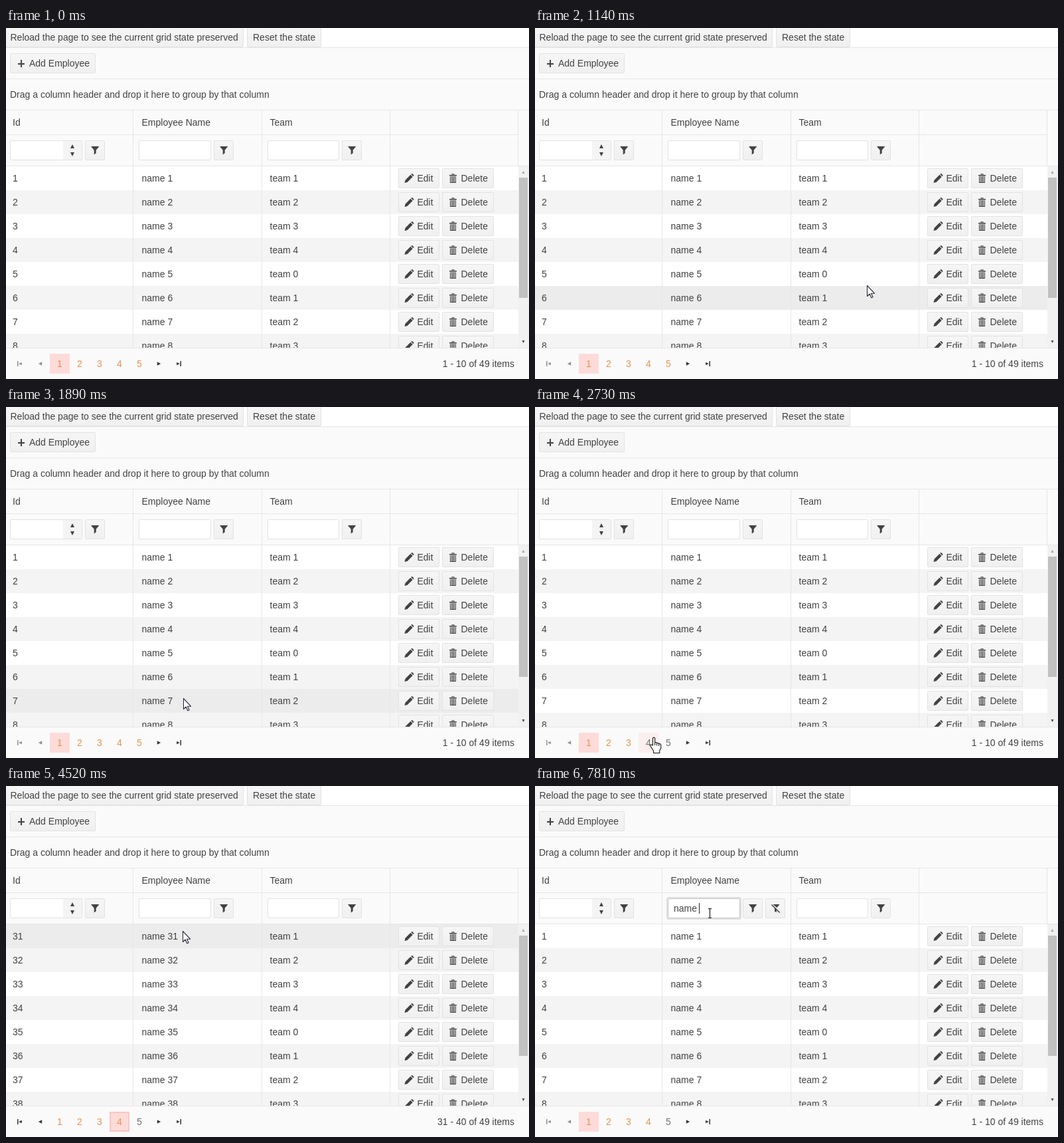
An HTML page with a canvas that plays this animation: 788x528 px, repeating every 8 s.

```html
<!DOCTYPE html>
<html lang="en">
<head>
<meta charset="utf-8">
<title>Employee grid</title>
<style>
  html, body { margin: 0; width: 100%; height: 100%; overflow: hidden; background: #fff; }
  canvas { display: block; }
</style>
</head>
<body>
<canvas width="788" height="528"></canvas>
<script>
const ctx = document.querySelector('canvas').getContext('2d');
const LOOP = 8000, STEP = 67.5;
const INK = '#424242', LINK = '#e8924f', LINE = '#e6e6e6', PANEL = '#fafafa';

// Pointer runs: start time, then [step, x, y] points joined linearly.
const runs = [
  [870, [0, 556, 514], [2, 528, 448], [4, 500, 387], [5, 492, 374]],
  [1620, [0, 470, 377], [2, 370, 401], [4, 267, 438], [7, 230, 476], [9, 204, 499], [11, 173, 494]],
  [2450, [0, 173, 495], [4, 179, 497]],
  [3060, [0, 178, 487], [3, 172, 486]],
  [4310, [0, 186, 474], [1, 216, 390], [2, 244, 302], [3, 266, 218], [5, 266, 203], [9, 263, 191]],
];

const icons = {
  plus: new Path2D('M5 0h2v5h4v2h-4v4h-2v-4h-4v-2h4z'),
  funnel: new Path2D('M0 0h12.4l-4.7 5.8v4.4l-3 2.2v-6.6z'),
  unfilter: new Path2D('M2.5 0h10l-4 5zM0 1l5 5v4.5l2.8 1.8v-3.6l4.4 4.2 1-1L1 0z'),
  pencil: new Path2D('M0 14l1.1-4.3L9 1.8l3.2 3.2-8 8zM9.8 1l.7-.7q.7-.6 1.4 0l1.8 1.8q.6.7 0 1.4l-.7.7z'),
  trash: new Path2D('M0 2h3.5V.3h4V2H11v1.5H0zM4.5 1.2V2h2v-.8zM1 4.5h9V14H1zM2.1 5v8h1V5zM4.2 5v8h.8V5zM6 5v8h.8V5zM8 5v8h1V5z'),
  arrow: new Path2D('M.5.5v16l3.7-3.5 2.6 5.8 2.3-1-2.6-5.6h5z'),
  hand: new Path2D('M-1.5 12V1.7a1.6 1.6 0 0 1 3.2 0V8q2.6-1.3 3 .8 2.6-1 3 .9 2.6-.8 3 1.6V16l-2 4v3.5h-9v-3l-4.5-7q-1-3 1.8-2.3zM1.7 8v4M4.7 9v3.5M7.7 10v3'),
  beam: new Path2D('M-2.5-6.5h2l.5.5.5-.5h2M0-6v13M-2.5 7.5h2L0 7l.5.5h2'),
};

function rect(x, y, w, h, color) {
  ctx.fillStyle = color;
  ctx.fillRect(x, y, w, h);
}

function text(value, x, y, color = INK, align = 'left') {
  ctx.fillStyle = color;
  ctx.textAlign = align;
  ctx.fillText(value, x, y);
}

function box(x, y, w, h, fill, border = '#e2e2e2') {
  ctx.beginPath();
  ctx.roundRect(x + .5, y + .5, w - 1, h - 1, 1.5);
  ctx.fillStyle = fill;
  ctx.fill();
  ctx.strokeStyle = border;
  ctx.lineWidth = 1;
  ctx.stroke();
}

function button(x, y, w, h = 30) {
  const shade = ctx.createLinearGradient(0, y, 0, y + h);
  shade.addColorStop(0, '#f6f6f6');
  shade.addColorStop(1, '#f0f0f0');
  box(x, y, w, h, shade);
}

function icon(name, x, y, color = INK) {
  ctx.save();
  ctx.translate(x, y);
  ctx.fillStyle = color;
  ctx.fill(icons[name], 'evenodd');
  ctx.restore();
}

function triangle(x, y, dx, dy, color) {
  ctx.beginPath();
  ctx.moveTo(x + dx, y + dy);
  ctx.lineTo(x - dx + dy, y - dy + dx);
  ctx.lineTo(x - dx - dy, y - dy - dx);
  ctx.fillStyle = color;
  ctx.fill();
}

function filterButton(x) {
  button(x, 169, 30);
  icon('funnel', x + 9, 178);
}

function pointerAt(t) {
  const run = runs.findLast(([start]) => t >= start);
  if (!run) return null;
  const [start, ...points] = run;
  const step = Math.floor((t - start) / STEP);
  const next = points.findIndex(([s]) => s > step);
  let [, x, y] = points.at(-1);
  if (next > 0) {
    const [s0, x0, y0] = points[next - 1], [s1, x1, y1] = points[next];
    const k = (step - s0) / (s1 - s0);
    x = x0 + (x1 - x0) * k;
    y = y0 + (y1 - y0) * k;
  }
  let shape = 'arrow';
  if (y >= 484 && x >= 66 && x < 216) shape = 'hand';
  else if (y > 169 && y < 199 && x > 200 && x < 309) shape = 'beam';
  return { x: Math.round(x), y: Math.round(y), shape };
}

function drawTop() {
  rect(0, 0, 788, 528, '#fff');
  button(-2, -2, 360, 31);
  text('Reload the page to see the current grid state preserved', 6.5, 19);
  button(363, -2, 112, 31);
  text('Reset the state', 372, 19);

  rect(0, 29, 788, 179, PANEL);
  [29, 76, 123, 207].forEach(y => rect(0, y, 788, 1, LINE));
  rect(0, 160, 772, 1, LINE);
  [191, 385, 578, 771].forEach(x => rect(x, 124, 1, 84, LINE));
  button(6, 38, 129);
  icon('plus', 17, 48);
  text('Add Employee', 35, 58);
  text('Drag a column header and drop it here to group by that column', 6, 105);
  text('Id', 10, 147);
  text('Employee Name', 204.5, 147);
  text('Team', 397.5, 147);
}

function drawFilters(t) {
  box(6, 169, 109, 30, '#fff');
  rect(86, 170, 28, 28, '#f4f4f4');
  triangle(100, 178, 0, -3, INK);
  triangle(100, 190, 0, 3, INK);
  filterButton(119);

  const focus = Math.max(0, Math.min(1, (t - 5220) / 200));
  if (focus) {
    ctx.beginPath();
    ctx.roundRect(199, 168, 111, 32, 2);
    ctx.strokeStyle = `rgba(0,0,0,${.1 * focus})`;
    ctx.lineWidth = 2;
    ctx.stroke();
  }
  box(200, 169, 109, 30, '#fff', focus ? `rgb(${Array(3).fill(226 - 28 * focus)})` : undefined);
  filterButton(313);
  if (t >= 6950) {
    text('name', 209, 189);
    button(347, 169, 30);
    icon('unfilter', 356, 178);
  }
  if (t >= 5290 && t < 5820) rect(209, 176, 1, 16, '#222');
  if (t >= 6950 && t < 7480) rect(244, 176, 1, 16, '#222');
  if (t >= 7810) rect(247, 176, 1, 16, '#222');

  box(394, 169, 108, 30, '#fff');
  filterButton(506);
}

function drawRows(first, pointer) {
  const inRows = pointer?.shape === 'arrow' && pointer.y >= 207 && pointer.y < 481;
  const hovered = inRows ? Math.floor((pointer.y + 1 - 208) / 36) : -1;
  ctx.save();
  ctx.beginPath();
  ctx.rect(0, 208, 788, 273);
  ctx.clip();
  for (let i = 0; i < 8; i++) {
    const y = 208 + i * 36, id = first + i;
    rect(0, y, 772, 36, i === hovered ? '#ececec' : i % 2 ? '#f4f4f4' : '#fff');
    [191, 385, 578].forEach(x => rect(x, y, 1, 36, LINE));
    text(id, 10, y + 23);
    text('name ' + id, 204.5, y + 23);
    text('team ' + id % 5, 397.5, y + 23);
    button(591, y + 3, 62);
    icon('pencil', 600.5, y + 11);
    text('Edit', 619.5, y + 23);
    button(657, y + 3, 78);
    icon('trash', 668, y + 11);
    text('Delete', 685.5, y + 23);
  }
  rect(772, 208, 16, 273, '#f1f1f1');
  rect(773, 225, 13, 181, '#c1c1c1');
  triangle(779.5, 217, 0, -2, '#a0a0a0');
  triangle(779.5, 472, 0, 2, '#444');
  ctx.restore();
}

function drawPager(t, page, pointer) {
  rect(0, 481, 788, 47, PANEL);
  rect(0, 481, 788, 1, LINE);
  const back = page === 1 ? '#8f8f8f' : '#333';
  rect(17, 501, 1.5, 8, back);
  triangle(21.5, 505, -2.3, 0, back);
  triangle(51.5, 505, -2.7, 0, back);
  triangle(230.5, 505, 2.7, 0, '#333');
  triangle(259.5, 505, 2.3, 0, '#333');
  rect(262.5, 501, 1.5, 8, '#333');

  const hovered = pointer?.shape === 'hand' ? Math.floor((pointer.x - 66) / 30) + 1 : 0;
  for (let n = 1; n <= 5; n++) {
    const x = 36 + n * 30, hover = n === hovered && n !== page;
    if (n === page) rect(x, 490, 30, 30, '#fddbd9');
    else if (hover) rect(x, 490, 30, 30, '#fbeeee');
    if (n === 4 && t >= 3650 && t < 5290) {
      ctx.strokeStyle = '#fbc6c2';
      ctx.lineWidth = 2;
      ctx.strokeRect(x + 1, 491, 28, 28);
    }
    const visited = n === 5 && t >= 2228;
    text(n, x + 15, 510, hover || visited ? '#707070' : LINK, 'center');
  }
  const from = page * 10 - 9;
  text(`${from} - ${from + 9} of 49 items`, 766, 510, INK, 'right');
}

function drawPointer({ x, y, shape }) {
  ctx.save();
  ctx.translate(x, y);
  ctx.lineWidth = 1.1;
  ctx.lineJoin = 'round';
  ctx.strokeStyle = shape === 'arrow' ? '#2a2a3c' : '#111';
  ctx.fillStyle = '#fff';
  if (shape === 'beam') ctx.translate(.5, 0);
  else ctx.fill(icons[shape]);
  ctx.stroke(icons[shape]);
  ctx.restore();
}

function draw(t) {
  const pointer = pointerAt(t);
  const page = t >= 3650 && t < 6950 ? 4 : 1;
  const firstRow = t >= 3650 && t < 7150 ? 31 : 1;
  ctx.font = '14px "Liberation Sans", Arial, sans-serif';
  drawTop();
  drawFilters(t);
  drawRows(firstRow, pointer);
  drawPager(t, page, pointer);
  if (pointer) drawPointer(pointer);
}

const begin = performance.now();
function frame() {
  draw((performance.now() - begin) % LOOP);
  requestAnimationFrame(frame);
}
frame();
</script>
</body>
</html>
```
